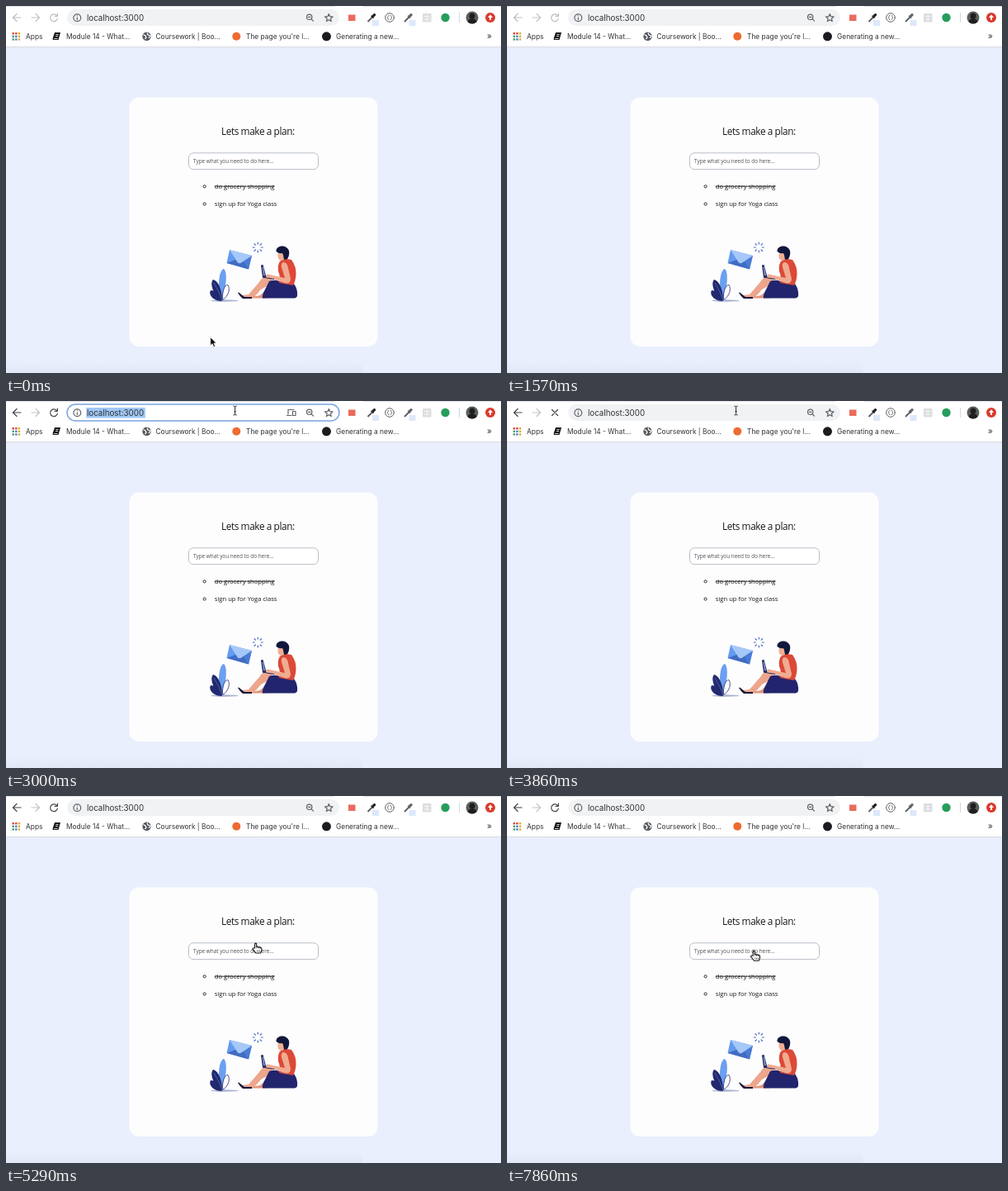
An HTML page that plays this animation: 600x444 px, repeating every 8 s.

```html
<!DOCTYPE html>
<html lang="en">
<head>
<meta charset="utf-8">
<title>Lets make a plan</title>
<style>
  html, body { margin: 0; width: 100%; height: 100%; overflow: hidden; background: #e9effd; }
  svg { display: block; width: 100%; height: 100%; }
  .ui { font: 8.4px Inter, Roboto, sans-serif; fill: #303236; }
  .page { font: 7.6px "Open Sans", "Noto Sans", sans-serif; fill: #17171a; }
  .title { font-size: 11.8px; letter-spacing: -.034em; }
  .line { fill: none; stroke: #5f6368; stroke-width: 1.2; stroke-linecap: round; stroke-linejoin: round; }
</style>
</head>
<body>
<svg viewBox="0 0 600 444">
  <defs>
    <linearGradient id="shade" x2="0" y2="1">
      <stop stop-color="#e9effd"/><stop offset="1" stop-color="#e0e5f3"/>
    </linearGradient>
    <clipPath id="face"><circle cx="565" cy="14" r="7.5"/></clipPath>
    <g id="dropper" fill="none" stroke="currentColor">
      <rect x="1" y="3" width="8" height="7" fill="#dde8fb" stroke="none"/>
      <path d="M-4.500 5L1.500-1" stroke="#5a5d62" stroke-width="1.800"/>
      <path d="M-.5-2.300L2.500 .7" stroke-width="1.300"/>
      <path d="M1.800-1.600L3.600-3.400" stroke-width="3.200" stroke-linecap="round"/>
    </g>
  </defs>

  <rect width="600" height="444" fill="#e9effd"/>
  <rect x="-14" y="429" width="446" height="22" rx="12" fill="url(#shade)"/>

  <g id="page">
    <rect x="149.500" y="110.500" width="301" height="301.500" rx="12" fill="#fefdfe"/>
    <g class="page">
      <text x="261" y="156" class="title">Lets make a plan:</text>
      <rect x="221.500" y="177.800" width="157" height="19.800" rx="5.500" fill="#fff" stroke="#b2b8c1" stroke-width=".9"/>
      <text x="227" y="190.200" style="font-size:6.400px" fill="#4b4d53">Type what you need to do here...</text>
      <text x="252.800" y="220.500">do grocery shopping</text>
      <path d="M252.800 218.200H325.500" stroke="#17171a" stroke-width=".8"/>
      <text x="252.800" y="241.800">sign up for Yoga class</text>
      <g fill="none" stroke="#17171a" stroke-width=".9">
        <circle cx="240.600" cy="218.300" r="1.600"/><circle cx="240.600" cy="239.500" r="1.600"/>
      </g>
    </g>

    <g id="sparkle" stroke="#4868bd" stroke-width="1.200" stroke-linecap="round"></g>

    <!-- envelope -->
    <path d="M271 295L298 302L294 318.500L267.500 311Z" fill="#649bf0"/>
    <path d="M298 302L294 318.500L283 309Z" fill="#4b7cd4"/>
    <path d="M267.500 311L279.500 306.500L284 310.500L287 308L294 318.500Z" fill="#416cc2"/>
    <path d="M271 295L298 302L284.500 311Q282 312 280.500 310Z" fill="#a6c8f8"/>

    <!-- plant -->
    <ellipse cx="265" cy="356.500" rx="17" ry="1.200" fill="#a8b3d1"/>
    <path d="M260.500 355C256 339 258 321 263.500 318C269 320 267 341 262 355Z" fill="#6b9ff0"/>
    <g fill="#22296f">
      <path d="M261.500 356C250 349 247 335 251 331C258 333 262 345 262 356Z"/>
      <path d="M261 357C251 357 245 349 248 344C255 344 260 350 262 357Z"/>
    </g>
    <path d="M262.500 355.500C262 345 265 337 269 337.500C272 342 270 351 262.500 355.500Z" fill="#fff" stroke="#22296f" stroke-width=".8"/>
    <path d="M252 335Q259 346 262 356" fill="none" stroke="#86a9ee" stroke-width=".4"/>

    <!-- woman with laptop -->
    <path d="M324 329L313 328Q310 329 307 334L294 349L286 350L285 353H300Q304 349 309 343L318 338Z" fill="#eda68c"/>
    <path d="M318 341L308 350L298 352V353.500H318Z" fill="#e1947d"/>
    <path d="M281 347Q282 345.500 284 348L289 352H298V354H287Q284 352 281 347Z" fill="#18183d"/>
    <path d="M319 333Q327 330 333 334L349 336Q354 343 353 351Q352 354 346 353.500H311Q310 350 314 343Z" fill="#22246d"/>
    <path d="M333 301H341L342 310L333 311Z" fill="#e89c83"/>
    <path d="M330 298Q328 306 333 308Q337 309 340 304L341 297Z" fill="#f1ae95"/>
    <path d="M327.500 297C327 289 340 288 343 296C344 301 342 307 338 308C336 306 337 302 335 299Q331 300 327.500 297Z" fill="#11173c"/>
    <path d="M332 309Q338 305 346 307Q352 315 351.500 325Q351 333 348 338L331 335Q333 327 330 321Q329 313 332 309Z" fill="#dc4937"/>
    <path d="M336 310Q341 310 342 317L345 330Q345 336 339 335.500L317 328Q313 326 317 324.500L338 329L334 316Q333 311 336 310Z" fill="#f0ab91"/>
    <path d="M309 313.500L311.500 313L315.500 328L311 328.500Z" fill="#20265f"/>
    <path d="M310.500 316L311.700 315.500L314 326L312 326.500Z" fill="#7d96cb"/>
    <path d="M311 328L325 330.500" stroke="#20265f" stroke-width="1"/>
  </g>

  <!-- browser bars -->
  <rect width="600" height="49" fill="#fff"/>
  <path d="M0 .5H398M433 .5H600" stroke="#e0e2e6"/>
  <path d="M0 49.500H600" stroke="#d8dade"/>
  <g class="line">
    <path id="back" d="M18 14H8.500M13 9.500L8.500 14L13 18.500"/>
    <path d="M31 14H40.500M36 9.500L40.500 14L36 18.500" stroke="#c3c5c8"/>
    <path id="reload" d="M61.500 11.500A4.400 4.400 0 1 0 62.400 15M62.400 9V12.300H59"/>
    <path id="stop" d="M54.500 10.500L61.500 17.500M61.500 10.500L54.500 17.500"/>
  </g>
  <rect id="pill" x="74" y="4" width="330" height="20" rx="10"/>
  <rect id="selection" x="97.300" y="8" width="71.500" height="12.500" fill="#9fc6f4"/>
  <text class="ui" x="97.900" y="17.700" style="font-size:9.800px">localhost:3000</text>
  <g class="line">
    <circle cx="86.300" cy="14.200" r="4.400"/><path d="M86.300 14V16.500M86.300 11.900V12"/>
    <circle cx="367.700" cy="13.300" r="3.200"/><path d="M370 15.700L372.500 18.200M366.300 13.300H369"/>
    <path id="device" d="M342 16V10.500H349M340.500 17.500H346M347.500 12.500H351V17.500H347.500Z"/>
    <path id="star"/>
  </g>

  <rect x="415" y="10.500" width="8.500" height="7.500" fill="#ea6b5c"/>
  <use href="#dropper" x="443" y="14" color="#1f2023"/>
  <g class="line" style="stroke-width:1">
    <circle cx="465" cy="14" r="5.300"/>
    <path d="M464 11.300Q462.700 11.300 463 12.800Q463 14 462 14Q463 14 463 15.200Q462.700 16.700 464 16.700M466 11.300Q467.300 11.300 467 12.800Q467 14 468 14Q467 14 467 15.200Q467.300 16.700 466 16.700" style="stroke-width:.8"/>
  </g>
  <use href="#dropper" x="487.500" y="14" color="#606368"/>
  <rect x="505" y="9" width="10.500" height="10.500" rx="1" fill="#dcdddf"/>
  <path d="M507 12.500H513.500M507 16H513.500M510.200 10.500V18" stroke="#f5f5f6"/>
  <circle cx="532.500" cy="14" r="5.200" fill="#279d5d"/>
  <path d="M549.500 8V20" stroke="#d0d6e2"/>
  <g clip-path="url(#face)">
    <rect x="557" y="6" width="16" height="16" fill="#59615a"/>
    <circle cx="565" cy="12" r="3.500" fill="#201d20"/><circle cx="565" cy="21" r="6" fill="#201d20"/>
  </g>
  <circle cx="587" cy="14" r="6" fill="#d93a2c"/>
  <path d="M587 10.300L590 14H588V17H586V14H584Z" fill="#fff"/>

  <g id="apps"></g>
  <g class="ui">
    <text x="24" y="39.700">Apps</text>
    <text x="73" y="39.700">Module 14 - What…</text>
    <text x="181.500" y="39.700">Coursework | Boo…</text>
    <text x="291" y="39.700">The page you're l…</text>
    <text x="400" y="39.700">Generating a new…</text>
    <text x="583" y="40" style="font-size:10px">»</text>
  </g>
  <path d="M59 32H66L63.500 41H57Q56 40 57 38Z" fill="#17181a"/>
  <path d="M60.500 34.500H63.500M60 36.500H63M58 39.500H62.500" stroke="#fff" stroke-width=".8"/>
  <circle cx="170.500" cy="36.800" r="5.200" fill="#54585d"/>
  <path d="M166.500 34.500L169 36L170 38L168.500 40M171 32.500L172 35L175 36L173 39" fill="none" stroke="#fff" stroke-width="1.300"/>
  <circle cx="279.300" cy="36.800" r="5" fill="#ee6b32"/>
  <circle cx="388.500" cy="36.800" r="5.500" fill="#1b1c20"/>

  <!-- pointers -->
  <path id="arrow" d="M0 0V10.300L2.400 8.200L4.200 12L6 11.200L4.300 7.500H7.500Z" fill="#111" stroke="#fff" stroke-width=".8"/>
  <g id="beam" fill="none">
    <path id="stem" d="M-2-5.500Q0-5.500 0-4Q0-5.500 2-5.500M0-4V4M-2 5.500Q0 5.500 0 4Q0 5.500 2 5.500M-1 1H1" stroke="#fff" stroke-width="2"/>
    <path d="M-2-5.500Q0-5.500 0-4Q0-5.500 2-5.500M0-4V4M-2 5.500Q0 5.500 0 4Q0 5.500 2 5.500M-1 1H1" stroke="#222"/>
  </g>
  <g id="hand">
    <path d="M-1 6V.9Q0-.6 1.100.9V4.500Q2.600 3.600 3.400 5Q4.900 4.200 5.600 5.500Q7.200 5 7.300 6.800V8.500Q7 10 6 12H.2Q-1.500 9.500-3.500 7.500Q-3.800 5.700-2.200 6Z" fill="#fff" stroke="#161616" stroke-width="1.100" stroke-linejoin="round"/>
    <path d="M1.200 4.500V6.500M3.400 5V6.800M5.600 5.500V7M1.700 8.500V10.500M3.400 8.500V10.500M5 8.500V10.500" stroke="#161616" stroke-width=".6"/>
  </g>
</svg>

<script>
const LOOP = 8000, STEP = 1000 / 7;
const $ = id => document.getElementById(id);
const show = (id, on) => $(id).setAttribute("visibility", on ? "visible" : "hidden");
const polar = (r, turn) => [r * Math.cos(turn * 2 * Math.PI), r * Math.sin(turn * 2 * Math.PI)];

$("sparkle").innerHTML = Array.from({ length: 8 }, (_, i) => {
  const [a, b] = polar(4, i / 8), [c, d] = polar(6, i / 8);
  return `<path d="M${305.3 + a} ${292 + b}L${305.3 + c} ${292 + d}"/>`;
}).join("");

const hues = ["#d9483b", "#d9483b", "#e3ad35", "#4b9b61", "#4381d8", "#e3ad35", "#4b9b61", "#4381d8", "#e3ad35"];
$("apps").innerHTML = hues.map((hue, i) =>
  `<rect x="${7.5 + i % 3 * 3.6}" y="${32 + Math.floor(i / 3) * 3.6}" width="2.400" height="2.400" fill="${hue}"/>`).join("");

$("star").setAttribute("d", "M" + Array.from({ length: 10 }, (_, i) => {
  const [x, y] = polar(i % 2 ? 2.2 : 5, i / 10 - .25);
  return `${391.3 + x} ${14.5 + y}`;
}).join("L") + "Z");

// Pointer path: step, x, y, shape until the next key
const path = [
  [0, 247.7, 400.5, "arrow"], [4, 249, 396, "arrow"], [6, 260, 369.5, "arrow"], [8, 272, 290, "arrow"],
  [9, 277, 0, ""], [16, 277.6, 2, "beam"], [18, 277.6, 11.6, "beam"],
  [32, 277.6, 11.6, "arrow"], [35, 300, 150, "hand"], [37, 302.6, 178, "hand"],
  [39, 302, 181, "hand"], [42, 299.2, 187.2, "hand"], [56, 299.2, 187.2, "hand"]
];

function pointer(step) {
  const i = path.findIndex(key => key[0] > step) - 1;
  const [start, x, y, shape] = path[i], [end, nextX, nextY] = path[i + 1];
  const p = (step - start) / (end - start);
  return [x + (nextX - x) * p, y + (nextY - y) * p, shape];
}

function draw(now) {
  const step = Math.floor((now % LOOP + 4) / STEP) % 56;
  const active = step >= 17, focused = step >= 18 && step < 25, loading = step >= 25 && step < 30;
  const scrolled = step >= 4 && step < 9;

  $("page").setAttribute("transform", `translate(0 ${scrolled ? -1.5 : 0})`);
  for (const id of ["back", "reload", "stop"]) $(id).style.stroke = active ? "#424549" : "#bcbec1";
  show("reload", !loading);
  show("stop", loading);
  show("selection", focused);
  show("device", focused);
  $("pill").style.cssText = focused
    ? "fill:#fff;stroke:#7aa4e0;stroke-width:1.5" : "fill:#f0f2f4;stroke:none";

  const [x, y, shape] = pointer(step);
  for (const id of ["arrow", "beam", "hand"]) {
    show(id, id === shape);
    $(id).setAttribute("transform", `translate(${x} ${y})`);
  }
  requestAnimationFrame(draw);
}
draw(performance.now());
</script>
</body>
</html>
```
